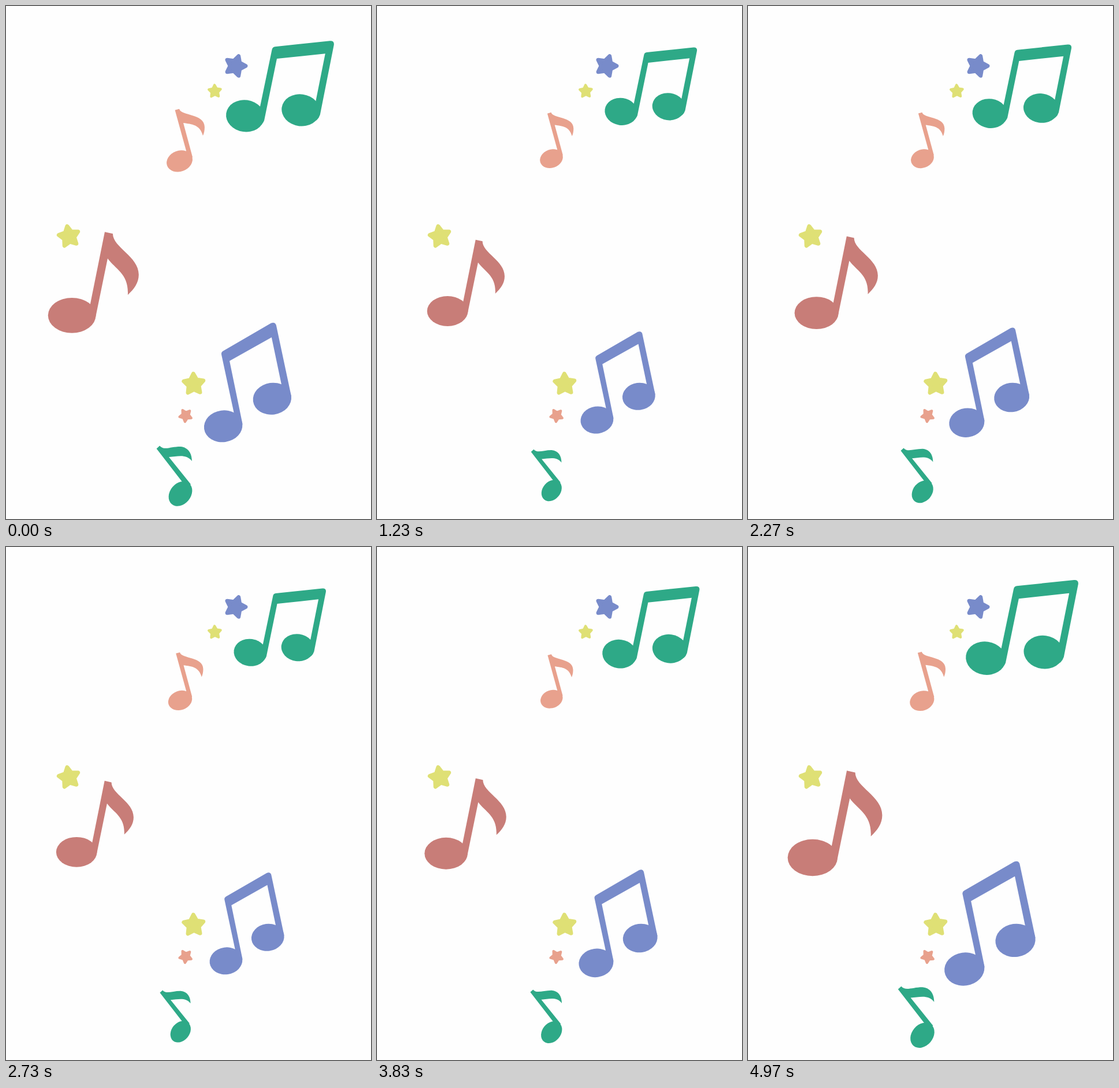
Recreate the animation shown at these times as an HTML page. Size 632 px wide and 886 px high, loop 5010 ms.

```html
<!DOCTYPE html>
<html lang="en">
<head>
<meta charset="utf-8">
<title>Pulsing notes</title>
<style>
html, body { margin: 0; width: 100%; height: 100%; overflow: hidden; background: #fefefe; }
svg { display: block; width: 632px; height: 886px; }
</style>
</head>
<body>
<svg id="stage" viewBox="0 0 632 886"></svg>
<script>
const GREEN = '#2ea987', BLUE = '#788bca', PEACH = '#e8a18d', RED = '#c87d78', YELLOW = '#dfe075';
const LOOP = 5010, PERIOD = 1503, PEAK = 242, FALL = 960, TOP = 1.147, DEPTH = 0.305;

// center: fixed point of the pulse; heads: [cx, cy, rx, ry, tilt]
const notes = [
  { color: GREEN, center: [473, 138], rate: 1,
    heads: [[414, 190, 33.3, 27.6, 8], [510.5, 180, 33.3, 27.6, 8]],
    d: 'M440 173L460.5 75Q461.5 70.5 466 70L561 60Q569 59.5 568 67L544 188Q540 200 530 200L537 162L553 82L469 91L447 198Q444 206 434 210Z' },
  { color: BLUE, center: [409, 651], rate: 1,
    heads: [[376, 726, 33.4, 27.5, -8], [461, 678.3, 33.4, 27.5, -8]],
    d: 'M394 700L373 602Q372 598 376 595.5L459 547.5Q466 545 468 551L494 673Q494 685 485 692L477 653L460 572L387 613L409.5 722Q409 735 400 742Z' },
  { color: RED, center: [169, 483], rate: 1,
    heads: [[114, 534.5, 41.5, 30.5, 0]],
    d: 'M146 514L171 390L185 393C185 417 230 432 230 464C230 478 222 489 211 499C213 463 190 455 176 436L155 538L140 545Z' },
  { color: PEACH, center: [313, 231], rate: 1.05,
    heads: [[300.5, 268, 23, 18, -20]],
    d: 'M312 250L292.5 179.5L300 177.5C303 190 344 185 344 209C344 215 343 220 341 224C336 205 322 204 307 202L323 261L312 268Z' },
  { color: GREEN, center: [304, 803], rate: 1.01,
    heads: [[302, 842.5, 23.5, 18, -50]],
    d: 'M306 823L260.5 764.5L266 759.5C273 768 285 761 302 761C316 762 322 773 322 786C312 773 297 778 282 779L320 826L312 834Z' }
];

// [color, cx, cy, radius, rotation]
const stars = [
  [BLUE, 397.3, 103.5, 21, 0],
  [YELLOW, 361.5, 147.3, 12.8, -20],
  [YELLOW, 109, 398, 21.2, -28],
  [YELLOW, 325, 653, 21.2, -20],
  [PEACH, 311, 707.3, 12.8, 24]
];

const stage = document.getElementById('stage');

function add(parent, tag, attrs) {
  const el = document.createElementNS('http://www.w3.org/2000/svg', tag);
  for (const key in attrs) el.setAttribute(key, attrs[key]);
  return parent.appendChild(el);
}

const starPoints = Array.from({ length: 10 }, (_, i) => {
  const r = i % 2 ? 0.44 : 0.84, a = i * Math.PI / 5;
  return [r * Math.cos(a), r * Math.sin(a)];
}).join(' ');

for (const [color, x, y, r, turn] of stars) {
  add(stage, 'polygon', {
    points: starPoints, fill: color, stroke: color, 'stroke-width': 0.33, 'stroke-linejoin': 'round',
    transform: `translate(${x} ${y}) rotate(${turn}) scale(${r})`
  });
}

for (const note of notes) {
  note.el = add(stage, 'g', { fill: note.color });
  add(note.el, 'path', { d: note.d });
  for (const [cx, cy, rx, ry, tilt] of note.heads) {
    add(note.el, 'ellipse', { cx, cy, rx, ry, transform: `rotate(${tilt} ${cx} ${cy})` });
  }
}

// Slow eased shrink, then a quicker and nearly straight growth
function pulse(t) {
  const u = (t - PEAK + PERIOD) % PERIOD;
  const drop = u < FALL
    ? Math.sin(u / FALL * Math.PI / 2)
    : 1 - ((u - FALL) / (PERIOD - FALL)) ** 1.15;
  return TOP - DEPTH * drop;
}

function draw(now) {
  const t = now % LOOP;
  for (const { el, center: [x, y], rate } of notes) {
    el.setAttribute('transform', `translate(${x} ${y}) scale(${pulse(t * rate)}) translate(${-x} ${-y})`);
  }
}

const start = performance.now();
function tick() {
  draw(performance.now() - start);
  requestAnimationFrame(tick);
}
tick();
</script>
</body>
</html>
```
